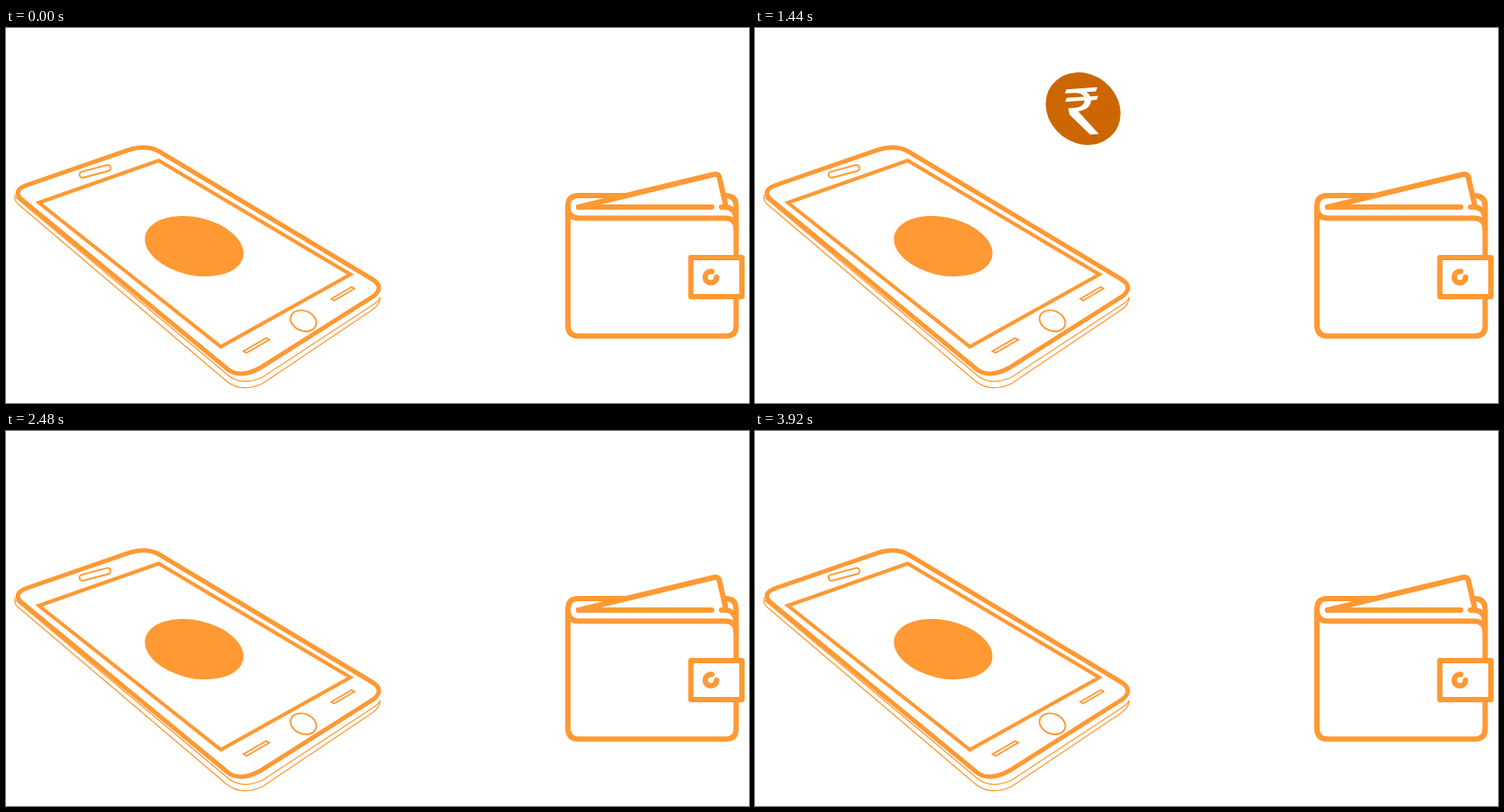
These frames come from a looping animation (837x423 px, 5.44 s). An HTML page with a canvas:

```html
<!DOCTYPE html>
<html lang="en">
<head>
<meta charset="utf-8">
<title>Phone to wallet</title>
<style>
  html, body { margin: 0; width: 100%; height: 100%; overflow: hidden; background: #fff; }
  canvas { display: block; width: 837px; height: 423px; }
</style>
</head>
<body>
<canvas id="stage" width="837" height="423"></canvas>
<script>
const ctx = document.getElementById('stage').getContext('2d');
const ORANGE = '#ff9933', COIN = '#cc6600';
const LOOP = 5440, STEP = 40, LAST = 17;

// Launch times of the coins, three bursts of three
const launches = [80, 1240, 2520].flatMap(t => [t, t + 240, t + 440]);

// Flight: step, x, y
const flight = [
  [0, 216.5, 210], [4, 336.5, 109], [7, 436, 55], [9, 515.5, 48.5],
  [10, 555.5, 51], [11, 595, 53.5], [13, 656.5, 89], [17, 767, 253]
];
// Tilt: step, then the a, b, c, d of the coin's matrix
const tilt = [
  [0, 1.11, -0.3, 0.85, 0.89], [4, 1.04, -0.1, 0.3, 1.02],
  [7, 1, 0, 0, 1], [17, 1, 0, 0, 1]
];

function sample(keys, p) {
  let i = 0;
  while (i < keys.length - 2 && p > keys[i + 1][0]) i++;
  const from = keys[i], to = keys[i + 1];
  const k = (p - from[0]) / (to[0] - from[0]);
  return from.slice(1).map((v, n) => v + (to[n + 1] - v) * k);
}

function line(d, width, fill) {
  const path = new Path2D(d);
  if (fill) { ctx.fillStyle = fill; ctx.fill(path); }
  ctx.strokeStyle = ORANGE;
  ctx.lineWidth = width;
  ctx.stroke(path);
}

function ellipse(x, y, rx, ry, angle) {
  ctx.beginPath();
  ctx.ellipse(x, y, rx, ry, angle, 0, Math.PI * 2);
}

function drawPhone() {
  ctx.lineCap = 'butt';
  ctx.lineJoin = 'miter';
  // Edges below the body
  line('M10 188V193Q10.5 196 14 199L248 398Q265 412 289 401L411 319Q421 313 421.5 304', 1.3);
  line('M11 191L250 391.5Q264 404 288 394.5L412 313Q419 309 421.5 304', 1.3);
  // Body and screen
  line('M24 177L140 137Q159 131.5 173 139.5L412 283Q427 292 414 302.5L286 383.5Q265 395 251 386L17 193Q7 183 24 177Z', 5, '#fff');
  line('M37 197L172 149.5L388 278L242 359.5Z', 4);
  // Speaker
  ctx.save();
  ctx.translate(100.3, 161.7);
  ctx.rotate(-0.26);
  ctx.beginPath();
  ctx.roundRect(-18, -3.4, 36, 6.8, 3.4);
  ctx.lineWidth = 1.9;
  ctx.stroke();
  ctx.restore();
  // Keys
  line('M267.5 364.5L293 349.8L296.5 351.5L271 366.5Z', 1.8);
  line('M366.5 305.5L389.5 292L392.5 294L369.5 307.5Z', 1.8);
  ellipse(335, 330.3, 15, 11.3, 0.4);
  ctx.lineWidth = 1.9;
  ctx.stroke();
  // Badge
  ellipse(212, 246.2, 56.4, 32.7, 0.216);
  ctx.fillStyle = ORANGE;
  ctx.fill();
}

function drawWallet() {
  ctx.lineCap = ctx.lineJoin = 'round';
  line('M700 189H645Q633 189 633 201V335Q633 347.5 645 347.5H811Q822.5 347.5 822.5 336V201Q822.5 189 810 189', 6);
  line('M633 201Q633 214.5 645 214.5H810Q822.5 214.5 822.5 227', 6);
  line('M645 202L796 165.5Q802 164 803.5 168L811 201', 6, '#fff');
  line('M645 202H795M806 202H811Q820 203 822 212', 6);
  line('M771.5 259H829V303H771.5Z', 6, '#fff');
  ctx.beginPath();
  ctx.arc(794, 281, 6.4, 0, Math.PI * 1.55);
  ctx.lineWidth = 6.2;
  ctx.stroke();
}

const rupee = new Path2D(
  'M-14 -22.5H20L17.5 -18H7Q10 -16 10.5 -13H19L16.5 -8.8H10.5' +
  'Q8 1 -6 2.5L11.5 29H2L-16 5.5V-1.5H-9Q1 -1.5 3.5 -8.8' +
  'H-18L-15.5 -13H3.5Q2 -18 -7 -18H-16.5Z'
);

function drawCoin(p) {
  ctx.save();
  ctx.translate(...sample(flight, p));
  ctx.transform(...sample(tilt, p), 0, 0);
  ellipse(0, 0, 40.3, 40.3, 0);
  ctx.fillStyle = COIN;
  ctx.fill();
  ctx.fillStyle = '#fff';
  ctx.fill(rupee);
  ctx.restore();
}

function draw(time) {
  ctx.fillStyle = '#fff';
  ctx.fillRect(0, 0, 837, 423);
  drawPhone();
  drawWallet();
  const now = Math.floor((time % LOOP) / STEP);
  for (const t of launches) {
    const p = now - t / STEP;
    if (p >= 0 && p <= LAST) drawCoin(p);
  }
}

const start = performance.now();
function tick() {
  draw(performance.now() - start);
  requestAnimationFrame(tick);
}
tick();
</script>
</body>
</html>
```
